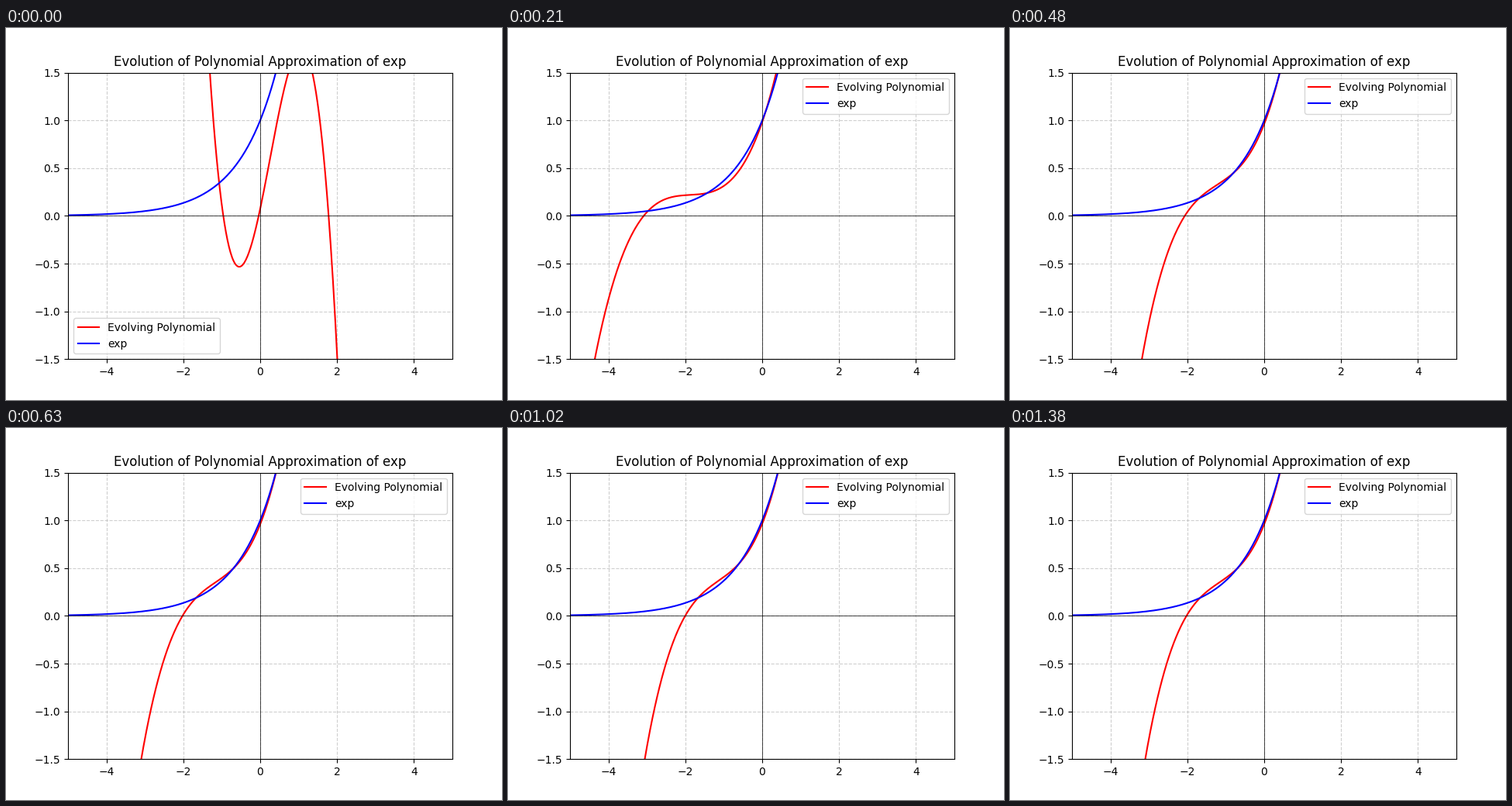
Animation of 640x480 px, one loop 1.51 s. Source, as a matplotlib script:

```python
import numpy as np
import matplotlib.pyplot as plt
from matplotlib.animation import FuncAnimation

TICK_MS = 10
LOOP_MS = 1510
STEP_MS = 30

# Steps at which the search reaches each stage.
BOWL, NEAR, SETTLED, LAST = 3, 7, 21, 46


def fit_exp(*crossings):
    """Cubic that meets exp at four crossings."""
    return np.polyfit(crossings, np.exp(crossings), 3)


first_guess = -1.094 * np.poly([-0.96, -0.04, 1.78])
bowl = np.array([0.047, 0.91, 1.46, 0.366])
near_fit = fit_exp(-2.97, -1.43, 0.09, 1.52)


def settled_fit(step):
    """Final fit; its second crossing drifts out and back."""
    phase = np.clip((step - SETTLED) / (LAST - SETTLED), 0, 1)
    return fit_exp(-1.67, -0.7 + 0.1 * np.sin(np.pi * phase), 0.46, 1.67)


def blend(a, b, t):
    return a + (b - a) * t


def coeffs_at(step):
    if step < BOWL:
        return blend(first_guess, bowl, step / BOWL)
    if step < NEAR:
        return blend(bowl, near_fit, (step - BOWL) / (NEAR - BOWL))
    t = min((step - NEAR) / (SETTLED - NEAR), 1)
    return blend(near_fit, settled_fit(step), 1 - (1 - t) ** 2)


x = np.linspace(-5, 5, 500)

fig, ax = plt.subplots(figsize=(6.4, 4.8), dpi=100)
poly_line, = ax.plot(x, np.polyval(first_guess, x), color="red",
                     label="Evolving Polynomial")
ax.plot(x, np.exp(x), color="blue", label="exp")
ax.axhline(0, color="black", linewidth=0.5)
ax.axvline(0, color="black", linewidth=0.5)
ax.grid(True, linestyle="--", alpha=0.6)
ax.set_xlim(-5, 5)
ax.set_ylim(-1.5, 1.5)
ax.set_title("Evolution of Polynomial Approximation of exp")
legend = ax.legend(loc="lower left")


def update(tick):
    step = min(tick * TICK_MS // STEP_MS, LAST)
    poly_line.set_ydata(np.polyval(coeffs_at(step), x))
    # The right corner is free once the curve no longer falls there.
    legend.set_loc("lower left" if step < BOWL else "upper right")
    return poly_line, legend


anim = FuncAnimation(fig, update, frames=LOOP_MS // TICK_MS,
                     interval=TICK_MS, repeat=True, repeat_delay=0)
plt.show()
```
